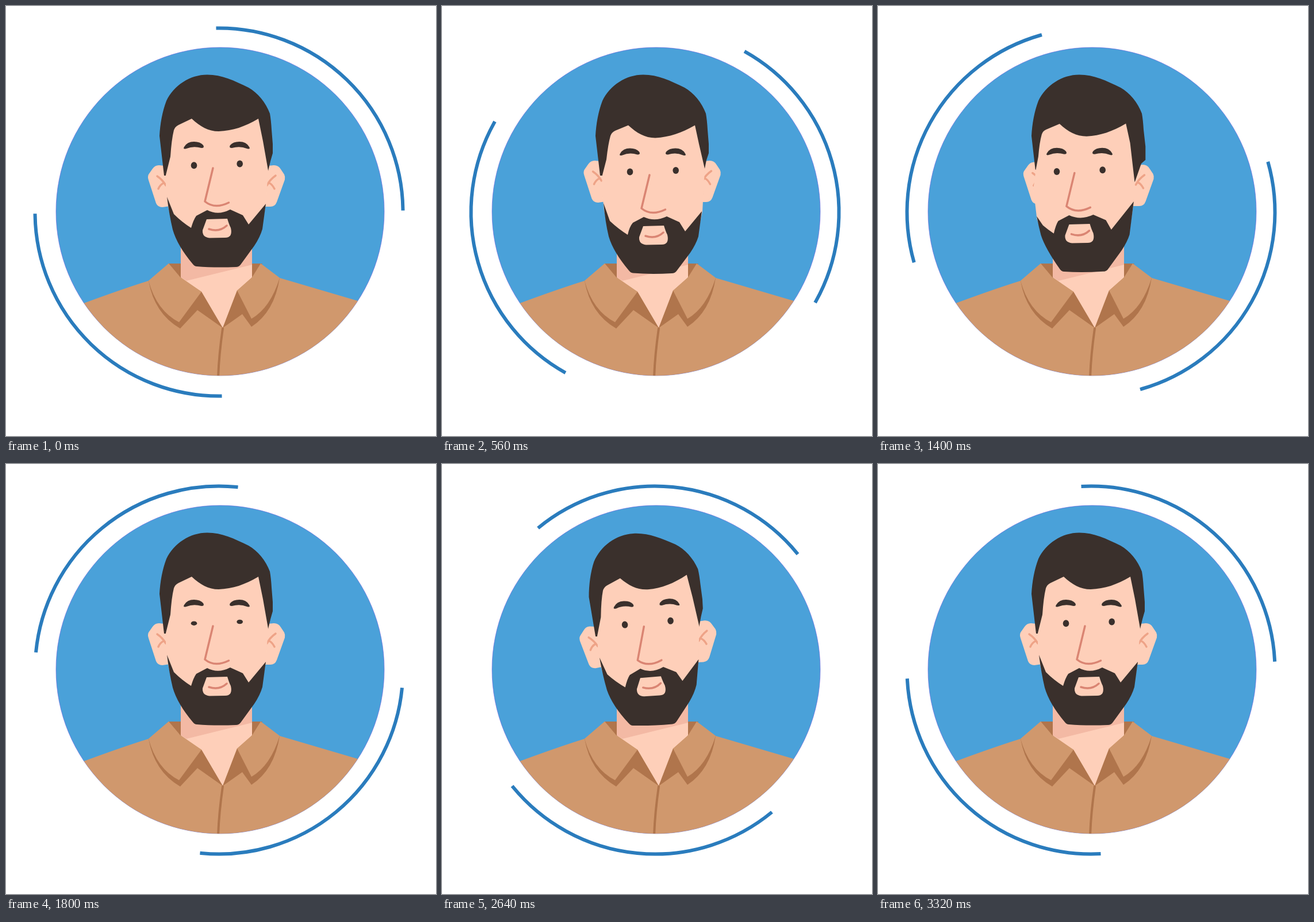
Animation, 748 px wide and 748 px high, one loop 3360 ms. Source, as an HTML page with a canvas:

```html
<!DOCTYPE html>
<html lang="en">
<head>
<meta charset="utf-8">
<title>Portrait</title>
<style>
  html, body { margin: 0; width: 100%; height: 100%; overflow: hidden; background: #fff; }
  canvas { display: block; }
</style>
</head>
<body>
<canvas id="stage" width="748" height="748"></canvas>
<script>
const ctx = document.getElementById('stage').getContext('2d');
const LOOP = 3360, STEP = 40, RAD = Math.PI / 180;
const C = {
  sky: '#4aa1d9', ring: '#2a7cbd', shirt: '#d0986d', fold: '#b0754c',
  hair: '#3a302c', skin: '#fecfb9', shade: '#f3b9a4', line: '#da8573', ear: '#eea387'
};

// Each morphing shape has a rest, a nodding and a turned outline.
const HAIR = {
  rest: 'M275 295 L267 226 C268 205 272 183 279 165 C292 138 320 119.5 350 119.5 C376 119.5 397 130 422 142 C438 151 452 168 459 187 Q461 198 462 215 L464 240 L464 256 L460 270 L456 287 L278 295 Z',
  nod: 'M275 295 L267 226 C268 205 272 183 279 165 C292 138 320 119.5 350 119.5 C376 119.5 397 130 422 142 C438 151 452 168 459 187 Q461 198 462 215 L464 240 L464 256 L460 268 L457 283 L279 295 Z',
  turn: 'M273 279 L267 226 C268 205 272 183 279 165 C292 138 320 119.5 350 119.5 C376 119.5 397 130 422 142 C438 151 452 168 459 187 Q461 198 462 215 L466 247 L466 274 L457 276 L442 316 L273 279 Z'
};
const FACE = {
  rest: 'M278 294 L286 262 Q288 232 292 216 Q294 210 300 207 L323 196 C338 210 352 218 370 218 C395 217 415 210 439 196 L447 235 L456 286 L452 345 L445 385 L405 445 L330 445 L291 388 L281 345 L278 318 Z',
  nod: 'M279 294 L286 267 Q289 240 293 226 Q295 220 301 217 L324 207.5 C339 221 353 229.5 371 229.5 C396 228 416 221 440 207.5 L447 240 L457 283 L453 357 L445 396 L405 456 L330 456 L291 399 L282 356 L278 318 Z',
  turn: 'M273 278 L275 262 Q277 240 281 227 Q283 221 289 219 L312 210 C327 224 341 231.5 359 231.5 C383 230 403 223 427 209 L434 240 L441 315 L441 340 L433 400 L391 458 L317 458 L283 406 L274 384 L266 318 Z'
};
const BEARD = {
  rest: 'M280 332 L292 362 Q306 376 322 386 Q326 372 331 365 L350 355 Q369 365 390 354 L412 364 L422 380 L452 344 L446 388 Q442 402 432 417 L408 450 Q405 454 400 454 Q362 455.5 332 453 Q328 453 325 449 Q298 417 290 389 Q284 364 280 332 Z',
  nod: 'M281 343 L292 374 Q307 388 323 398 Q326 384 332 377 L351 367 Q370 376 391 366 L413 376 L423 392 L452 357 L446 401 Q442 414 432 429 L408 461 Q405 465 400 465 Q362 467 332 464.5 Q328 464 325 460 Q298 428 290 401 Q284 376 281 343 Z',
  turn: 'M274 384 L284 392 Q290 396 297 401 Q300 386 304 379 L323 369 Q344 378 366 368 L388 377 L397 394 L441 338 L433 403 Q429 415 419 430 L395 463 Q392 466 387 466 Q350 469 319 467 Q315 467 312 463 Q287 424 280 404 Q277 394 274 384 Z'
};

const numbers = s => s.match(/[\d.]+/g).map(Number);
for (const s of [HAIR, FACE, BEARD]) s.nums = [s.rest, s.nod, s.turn].map(numbers);

function morph(s, nod, turn) {
  const [a, b, c] = s.nums;
  let i = 0;
  return s.rest.replace(/[\d.]+/g, () => {
    const v = a[i] + nod * (b[i] - a[i]) + turn * (c[i] - a[i]);
    i++;
    return v.toFixed(2);
  });
}

function fill(d, color) {
  ctx.fillStyle = color;
  ctx.fill(new Path2D(d));
}

function stroke(d, color, width) {
  ctx.strokeStyle = color;
  ctx.lineWidth = width;
  ctx.lineCap = ctx.lineJoin = 'round';
  ctx.stroke(new Path2D(d));
}

function at(x, y, draw) {
  ctx.save();
  ctx.translate(x, y);
  draw();
  ctx.restore();
}

const ease = u => u * u * (3 - 2 * u);

// Eased track through [time, value] keys.
function track(keys, t) {
  if (t <= keys[0][0]) return keys[0][1];
  for (let i = 1; i < keys.length; i++) {
    const [t0, v0] = keys[i - 1], [t1, v1] = keys[i];
    if (t <= t1) return v0 + (v1 - v0) * ease((t - t0) / (t1 - t0));
  }
  return keys[keys.length - 1][1];
}

const NOD = [[80, 0], [480, 1], [640, 1], [1000, 0]];
const TURN = [[640, 0], [1000, 1], [1240, 1], [1640, 0]];
const TILT = [[1820, 0], [2180, 7.5], [2300, 7.5], [2650, -3], [2780, -3], [3160, 0]];
const LIDS = [[920, 1], [1040, .28], [1160, 1], [1720, 1], [1800, .62], [1840, .28], [1960, 1]];

function drawRing(t) {
  const turn = 180 * t / LOOP;
  ctx.strokeStyle = C.ring;
  ctx.lineWidth = 6;
  ctx.lineCap = 'butt';
  for (const base of [0, 180]) {
    ctx.beginPath();
    ctx.arc(370.5, 358.5, 320, (base + turn - 90.9) * RAD, (base + turn - .5) * RAD);
    ctx.stroke();
  }
}

function drawBody() {
  fill('M90 534 Q190 496 248 478 L283 448 L443 448 L476 473 L612 513 L690 536 V690 H90 Z', C.shirt);
  fill('M283 448 H446 L428 473 H304 Z', C.fold);
  fill('M304 395 H428 V472 L402 495 L377 560 L340 497 L304 472 Z', C.skin);
  fill('M304 395 H428 V450 L314 478 L304 472 Z', C.shade);
  fill('M248 478 Q258 535 303 561 L333 529 L377 560 L340 497 Z', C.fold);
  fill('M476 473 Q467 532 427 558 L411 536 L377 560 L402 495 Z', C.fold);
  fill('M283 448 L248 478 Q262 530 301 550 L340 497 L304 473 Z', C.shirt);
  fill('M443 448 L476 473 Q460 525 427 544 L402 495 L428 472 Z', C.shirt);
  stroke('M377 561 Q370 610 369 648', C.fold, 4);
}

function drawEars(nod, turn) {
  at(-.5 * nod + 9 * turn, -8 * nod - 8.5 * turn, () => {
    fill('M286 279 L266 277 Q259 277 255 283 L248 293 Q246 297 248 303 L261 343 Q264 350 272 350 L286 348 Z', C.skin);
    stroke('M263 296 Q272 302 278 312 M265 318 Q268 311 274 308', C.ear, 3.5);
  });
  at(-.5 * nod - 8.5 * turn, -8 * nod - 1.5 * turn, () => {
    fill('M446 279 L466 277 Q474 277 478 284 L484 293 Q486 297 485 302 L471 341 Q468 349 460 349 L446 349 Z', C.skin);
    stroke('M469 295 Q459 302 454 312 M467 318 Q463 310 458 308', C.ear, 3.5);
  });
}

function drawEyes(lids) {
  const brow = 'M310 245 Q315 236 327 236 Q338 236 343 242 Q346 247 340 247 Q326 243 314 248 Q307 250 310 245 Z';
  fill(brow, C.hair);
  ctx.save();
  ctx.translate(733, 0);
  ctx.scale(-1, 1);
  fill(brow, C.hair);
  ctx.restore();
  for (const [x, y] of [[327, 277.2], [406.7, 274.5]]) {
    ctx.beginPath();
    ctx.ellipse(x, y, 5.3, 6 * lids, 0, 0, 7);
    ctx.fill();
  }
}

function drawHead(t) {
  const nod = track(NOD, t), turn = track(TURN, t);
  ctx.save();
  ctx.translate(369, 450);
  ctx.rotate(track(TILT, t) * RAD);
  ctx.translate(-369, -450);
  drawEars(nod, turn);
  fill(morph(HAIR, nod, turn), C.hair);
  fill(morph(FACE, nod, turn), C.skin);
  fill(morph(BEARD, nod, turn), C.hair);
  at(-24.7 * turn, 11.4 * nod + 16.7 * turn, () => drawEyes(track(LIDS, t)));
  at(nod - 28 * turn, 12 * nod + 13 * turn, () =>
    stroke('M360 282 L346 340 Q363 354 387.5 342', C.line, 3.5));
  at(nod - 25.5 * turn, 12 * nod + 13.7 * turn, () => {
    fill('M349 371 L385 370 Q388 380 391 386 Q395 403 381 403 L354 403.5 Q341 402 342 390 Z', C.skin);
    stroke('M353 388 Q371 394 384 382', C.line, 3.5);
  });
  ctx.restore();
}

function draw(t) {
  ctx.fillStyle = '#fff';
  ctx.fillRect(0, 0, 748, 748);
  const disc = new Path2D();
  disc.arc(372.5, 357.5, 285.5, 0, 2 * Math.PI);
  ctx.fillStyle = C.sky;
  ctx.fill(disc);
  ctx.strokeStyle = 'rgba(104, 92, 220, .6)';
  ctx.lineWidth = 1;
  ctx.stroke(disc);
  ctx.save();
  ctx.clip(disc);
  drawBody();
  drawHead(t);
  ctx.restore();
  drawRing(t);
}

const start = performance.now();
function frame() {
  const t = (performance.now() - start) % LOOP;
  draw(Math.floor(t / STEP) * STEP);
  requestAnimationFrame(frame);
}
frame();
</script>
</body>
</html>
```
